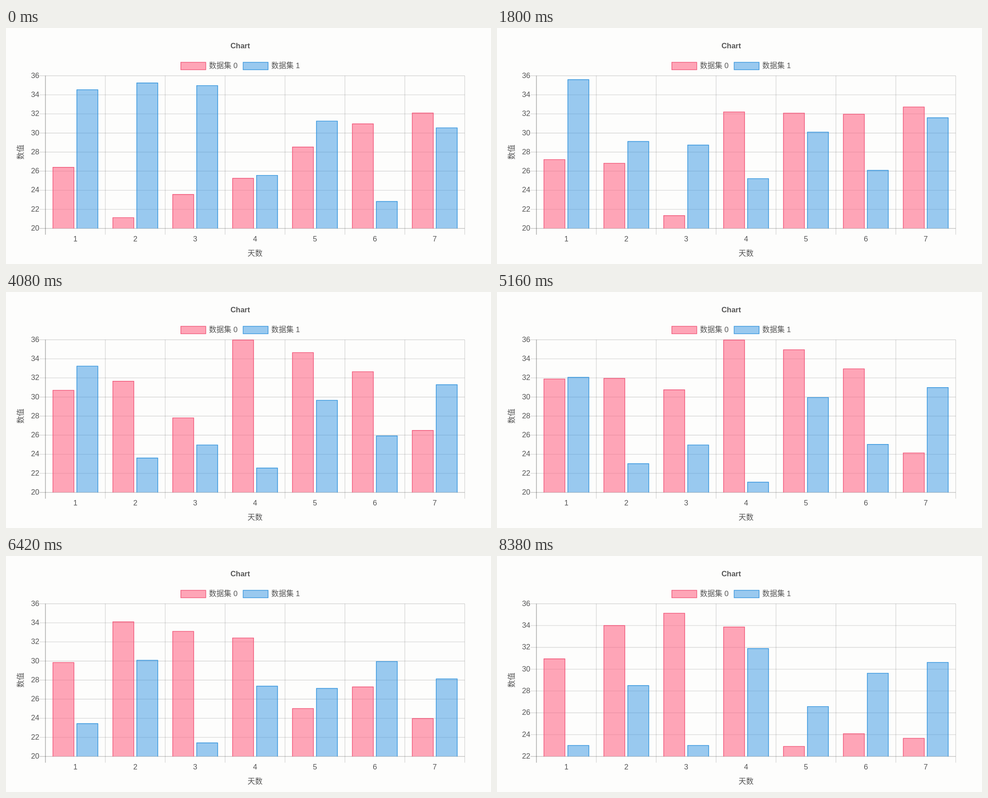
These frames come from a looping animation (1070 px wide and 523 px high, 8.48 s). An HTML page with a canvas:

```html
<!DOCTYPE html>
<html lang="zh-CN">
<head>
<meta charset="utf-8">
<title>Chart</title>
<style>
html, body { margin: 0; width: 100%; height: 100%; overflow: hidden; background: #fdfdfc; }
canvas { display: block; }
</style>
</head>
<body>
<canvas id="stage" width="1070" height="523"></canvas>
<script>
const ctx = document.getElementById('stage').getContext('2d');
const LOOP = 8480, LAST_STEP = 179;
const AREA = { left: 87, right: 1012, top: 105.8, bottom: 444.2 };
const FONT = '16.5px "Liberation Sans", "Noto Sans CJK SC", "Noto Sans CJK", sans-serif';
const LINE = 1.375, MAX = 36;
const CATEGORY = (AREA.right - AREA.left) / 7;
const BAR = CATEGORY * 0.4 * 0.9;

const SERIES = [
  { fill: 'rgba(255, 99, 132, 0.57)', border: '#f0587a', legendX: 385.7 },
  { fill: 'rgba(54, 150, 228, 0.5)', border: '#3595dd', legendX: 523.2 },
];

// Each data set arrives every 48 steps and eases in over 60 steps.
const PERIOD = 48, DURATION = 60, FIRST_START = -23;
const STATES = [
  { min: 20, data: [[29, 28, 33, 21, 26, 25, 21], [32, 31, 35, 35, 27, 22, 28]] },
  { min: 20, data: [[26, 20, 22, 26, 29, 32, 34], [35, 36, 35, 24, 32, 23, 31]] },
  { min: 20, data: [[28, 31, 21, 36, 34, 32, 32], [36, 25, 25, 26, 29, 28, 32]] },
  { min: 20, data: [[32, 32, 31, 36, 35, 33, 24], [32, 23, 25, 21, 30, 25, 31]] },
  { min: 20, data: [[29, 35, 34, 31, 21, 25, 24], [20, 33, 20, 30, 26, 32, 27]] },
  { min: 22, data: [[32, 33, 36, 36, 23, 22, 22], [24, 24, 24, 33, 26, 27, 33]] },
];

// Steps come in uneven triples lasting 20, 100 and 20 ms.
function stepAt(ms) {
  const rest = ms % 140;
  const part = rest < 20 ? 0 : rest < 120 ? 1 : 2;
  return Math.min(LAST_STEP, Math.floor(ms / 140) * 3 + part);
}

const easeOutQuart = p => 1 - (1 - p) ** 4;

const yOf = (value, min) =>
  AREA.bottom - (value - min) / (MAX - min) * (AREA.bottom - AREA.top);

function line(x1, y1, x2, y2, alpha = 0.15) {
  ctx.strokeStyle = `rgba(0, 0, 0, ${alpha})`;
  ctx.beginPath();
  ctx.moveTo(x1, y1);
  ctx.lineTo(x2, y2);
  ctx.stroke();
}

function text(label, x, y, align = 'center', weight = '') {
  ctx.font = `${weight} ${FONT}`;
  ctx.textAlign = align;
  ctx.fillStyle = '#555';
  ctx.fillText(label, x, y);
}

function drawHeader() {
  text('Chart', 516.7, 40, 'center', 'bold');
  SERIES.forEach(({ fill, border, legendX }, i) => {
    ctx.fillStyle = fill;
    ctx.strokeStyle = border;
    ctx.fillRect(legendX, 76, 55, 16.5);
    ctx.strokeRect(legendX, 76, 55, 16.5);
    text(`数据集 ${i}`, legendX + 62, 84.5, 'left');
  });
}

function drawAxes(min) {
  const { left, right, top, bottom } = AREA;
  for (let i = 0; i <= 7; i++) {
    const x = left + i * CATEGORY;
    line(x, top, x, bottom + 13.75, i ? 0.15 : 0.35);
    if (i < 7) text(i + 1, x + CATEGORY / 2, 468);
  }
  for (let value = min; value <= MAX; value += 2) {
    const y = yOf(value, min);
    line(left - 13, y, right, y, value === min ? 0.22 : 0.15);
    text(value, 73.5, y + 0.3, 'right');
  }
  text('天数', 549.5, 500);
  ctx.save();
  ctx.translate(33, 275);
  ctx.rotate(-Math.PI / 2);
  text('数值', 0, 0);
  ctx.restore();
}

function drawBar(x, y, { fill, border }) {
  const inset = LINE / 2;
  ctx.fillStyle = fill;
  ctx.fillRect(x, y, BAR, AREA.bottom - y);
  ctx.strokeStyle = border;
  ctx.beginPath();
  ctx.moveTo(x + inset, AREA.bottom);
  ctx.lineTo(x + inset, y + inset);
  ctx.lineTo(x + BAR - inset, y + inset);
  ctx.lineTo(x + BAR - inset, AREA.bottom);
  ctx.stroke();
}

function drawBars(from, to, progress) {
  SERIES.forEach((series, s) => {
    to.data[s].forEach((value, i) => {
      const start = yOf(from.data[s][i], from.min);
      const y = start + (yOf(value, to.min) - start) * progress;
      const x = AREA.left + CATEGORY * (i + 0.1 + 0.4 * s + 0.02);
      drawBar(x, y, series);
    });
  });
}

function draw(ms) {
  // A new data set first shows one step after it arrives.
  const elapsed = stepAt(ms) - FIRST_START - 1;
  const index = Math.floor(elapsed / PERIOD);
  const progress = easeOutQuart((elapsed % PERIOD + 1) / DURATION);
  const from = STATES[index], to = STATES[index + 1];

  ctx.fillStyle = '#fdfdfc';
  ctx.fillRect(0, 0, 1070, 523);
  ctx.lineWidth = LINE;
  ctx.textBaseline = 'middle';
  drawHeader();
  drawAxes(to.min);
  drawBars(from, to, progress);
}

const began = performance.now();
function tick() {
  draw((performance.now() - began) % LOOP);
  requestAnimationFrame(tick);
}
tick();
</script>
</body>
</html>
```
